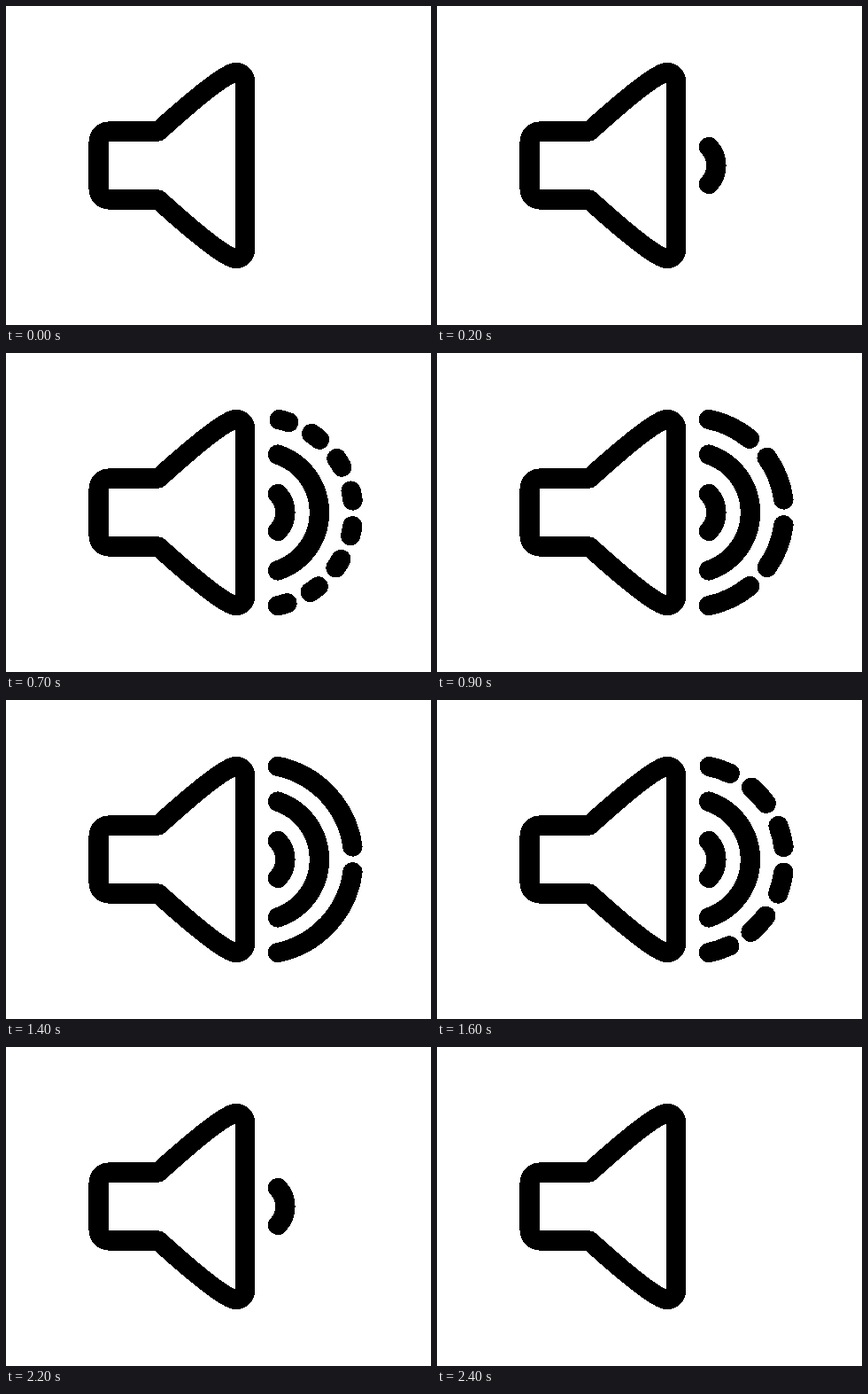
These frames come from a looping animation (480 px wide and 360 px high, 2.6 s). An HTML page:

```html
<!DOCTYPE html>
<html lang="en">
<head>
<meta charset="utf-8">
<title>Volume</title>
<style>
  html, body { margin: 0; width: 100%; height: 100%; overflow: hidden; background: #fff; }
  svg { display: block; width: 480px; height: 360px; shape-rendering: crispEdges; }
  path { fill: none; stroke: #000; stroke-width: 22.3; stroke-linecap: round; stroke-linejoin: round; }
</style>
</head>
<body>
<svg viewBox="0 0 480 360">
  <path d="M172 141.5 Q239 81 257 75.5 A10 10 0 0 1 270 85 V275 A10 10 0 0 1 257 284.5
           Q239 279 172 218.5 H116.6 A12 12 0 0 1 104.6 206.5 V153.5 A12 12 0 0 1 116.6 141.5 Z"/>
</svg>
<script>
const STEP = 100, LOOP = 2600, FALL = 1400, TOP = 11;
const CX = 285, CY = 180, HALF = 22, GAP = 29, FULL = 400;

// Each wave appears at step `from`; its dashes lengthen until they join.
const waves = [
  { r: 30.4, from: 1, dashes: [8.5, FULL] },
  { r: 69, from: 3, dashes: [11, 40, 71.5, FULL] },
  { r: 107.4, from: 7, dashes: [11, 24.5, 51.5, 132, FULL] }
];

const svg = document.querySelector('svg');
for (const wave of waves) {
  const h = Math.sqrt(wave.r ** 2 - HALF ** 2);
  const x = CX + HALF;
  wave.path = document.createElementNS(svg.namespaceURI, 'path');
  wave.path.setAttribute('d', `M${x} ${CY + h} A${wave.r} ${wave.r} 0 0 0 ${x} ${CY - h}`);
  svg.append(wave.path);
}

function levelAt(t) {
  return t < FALL
    ? Math.min(TOP, Math.floor(t / STEP))
    : Math.max(0, TOP - 1 - Math.floor((t - FALL) / STEP));
}

let start;
function draw(now) {
  start ??= now;
  const level = levelAt((now - start) % LOOP);
  for (const { path, from, dashes } of waves) {
    const i = Math.min(level - from, dashes.length - 1);
    path.style.display = i < 0 ? 'none' : '';
    if (i >= 0) path.setAttribute('stroke-dasharray', `${dashes[i]} ${GAP}`);
  }
  requestAnimationFrame(draw);
}
draw(performance.now());
</script>
</body>
</html>
```
